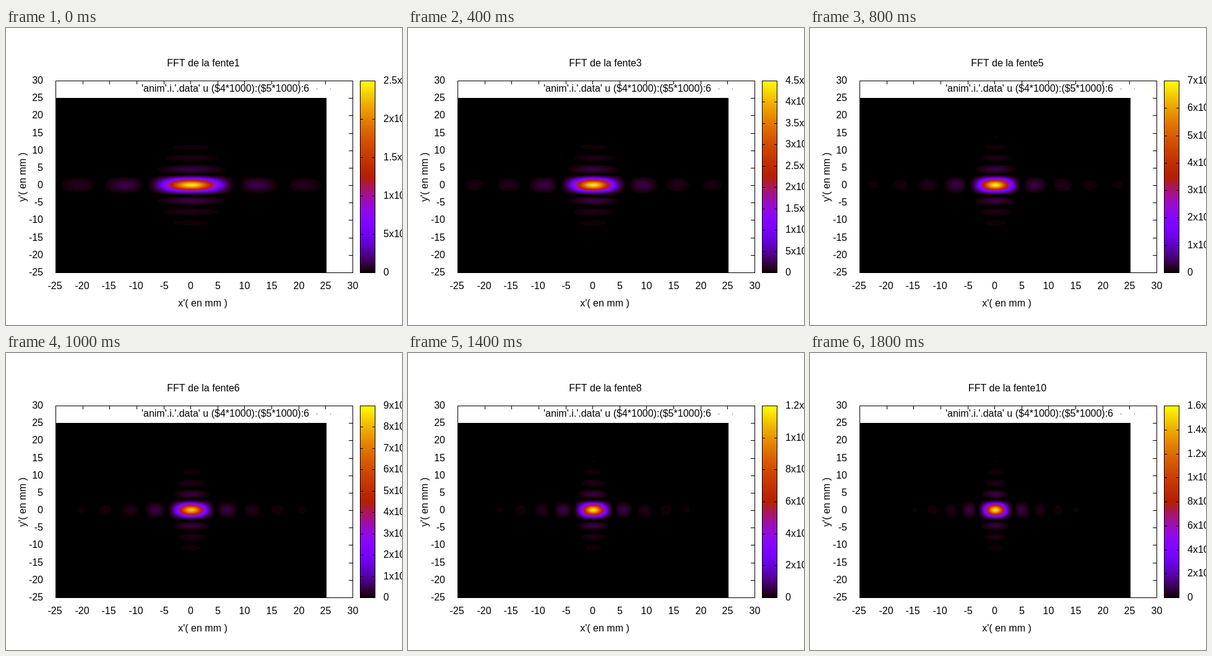
Animation of 640 by 480 pixels, one loop 2 s. Source, as an HTML page with a canvas:

```html
<!DOCTYPE html>
<html lang="fr">
<head>
<meta charset="utf-8">
<title>FFT de la fente</title>
<style>
html, body { margin: 0; width: 100%; height: 100%; overflow: hidden; background: #fff; }
canvas { display: block; }
</style>
</head>
<body>
<canvas id="plot" width="640" height="480"></canvas>
<script>
const ctx = document.getElementById('plot').getContext('2d');
const STEP_MS = 200;
const SCALE_MAX = [2.5, 3.5, 4.5, 6, 7, 9, 10, 12, 14, 16];
const LEVELS = 210;
const BOX = { l: 80, t: 85, r: 560, b: 395 };
const MAP = { x: 81, y: 113, w: 437, h: 282, cx: 299.5, cy: 253.7 };
const BAR = { l: 572, r: 596 };

// Classic black-violet-red-yellow palette
const palette = Array.from({ length: LEVELS }, (_, i) => {
  const g = i / (LEVELS - 1);
  return [Math.sqrt(g), g ** 3, Math.max(0, Math.sin(2 * Math.PI * g))].map(c => Math.round(c * 255));
});
const shade = g => palette[Math.max(0, Math.min(LEVELS - 1, Math.floor(g * LEVELS)))];
const css = g => `rgb(${shade(g)})`;

const sq = v => v * v;
const sinc2 = u => Math.abs(u) < 1e-6 ? 1 : sq(Math.sin(Math.PI * u) / (Math.PI * u));
// Discrete transforms lift the far lobes slightly
const lift = d => 1 / sinc2(d / 600);

function rect(x, y, w, h, color = '#000') {
  ctx.fillStyle = color;
  ctx.fillRect(x, y, w, h);
}

function frameBox(l, t, r, b) {
  rect(l, t, r - l + 1, 1);
  rect(l, b, r - l + 1, 1);
  rect(l, t, 1, b - t + 1);
  rect(r, t, 1, b - t + 1);
}

function text(s, x, y, align = 'center') {
  ctx.fillStyle = '#000';
  ctx.textAlign = align;
  ctx.fillText(s, x, y);
}

function drawPattern(i) {
  const freq = 0.01351 + 0.00231 * i;
  const peak = 2.4 * sq(freq / 0.01351) / SCALE_MAX[i];
  const row = Array.from({ length: MAP.w }, (_, k) => {
    const d = MAP.x + k + 0.5 - MAP.cx;
    return peak * sinc2(d * freq) * lift(d);
  });
  const img = ctx.createImageData(MAP.w, MAP.h);
  let p = 0;
  for (let y = 0; y < MAP.h; y++) {
    const v = sinc2((MAP.y + y + 0.5 - MAP.cy) / 17.6);
    for (const h of row) {
      const c = shade(h * v);
      img.data[p++] = c[0];
      img.data[p++] = c[1];
      img.data[p++] = c[2];
      img.data[p++] = 255;
    }
  }
  ctx.putImageData(img, MAP.x, MAP.y);
}

function drawAxes() {
  frameBox(BOX.l, BOX.t, BOX.r, BOX.b);
  for (let v = -25; v <= 30; v += 5) {
    const x = Math.round(BOX.l + (v + 25) * 480 / 55);
    const y = Math.round(BOX.b - (v + 25) * 310 / 55);
    rect(x, BOX.t, 1, 6);
    rect(x, BOX.b - 5, 1, 6);
    rect(BOX.l, y, 6, 1);
    rect(BOX.r - 6, y, 7, 1);
    text(v, x + (v < -5 ? -1 : 0.5), 422);
    text(v, 60, y + 5, 'right');
  }
  text("x'( en mm )", 318, 450);
  ctx.save();
  ctx.translate(32, 241);
  ctx.rotate(-Math.PI / 2);
  text("y'( en mm )", 0, 0);
  ctx.restore();
}

function drawKey() {
  text("'anim'.i.'.data' u ($4*1000):($5*1000):6", 490, 103, 'right');
  [0, 0.5, 1].forEach((g, k) => rect(502 + 22 * k, 98, 1, 1, css(g)));
}

function mantissa(v) {
  if (v === 0) return '0';
  const m = v < 1 ? v * 10 : v >= 10 ? v / 10 : v;
  return `${+m.toFixed(1)}x10`;
}

function drawBar(max) {
  const h = BOX.b - BOX.t;
  for (let y = 0; y < h; y++) rect(BAR.l, BOX.t + y, BAR.r - BAR.l, 1, css(1 - (y + 0.5) / h));
  frameBox(BAR.l, BOX.t, BAR.r, BOX.b);
  const step = max < 5 ? 0.5 : max <= 10 ? 1 : 2;
  for (let v = 0; v <= max; v += step) {
    const y = Math.round(BOX.b - h * v / max);
    rect(BAR.l, y, 5, 1);
    rect(BAR.r - 4, y, 5, 1);
    text(mantissa(v), 610, y + 5, 'left');
  }
}

function draw(i) {
  rect(0, 0, 640, 480, '#fff');
  ctx.font = '16px "Liberation Sans", Arial, sans-serif';
  drawPattern(i);
  drawAxes();
  drawKey();
  drawBar(SCALE_MAX[i]);
  text('FFT de la fente' + (i + 1), 319, 62);
}

let shown = -1;
function tick() {
  const i = Math.floor(performance.now() / STEP_MS) % SCALE_MAX.length;
  if (i !== shown) draw(shown = i);
  requestAnimationFrame(tick);
}
tick();
</script>
</body>
</html>
```
